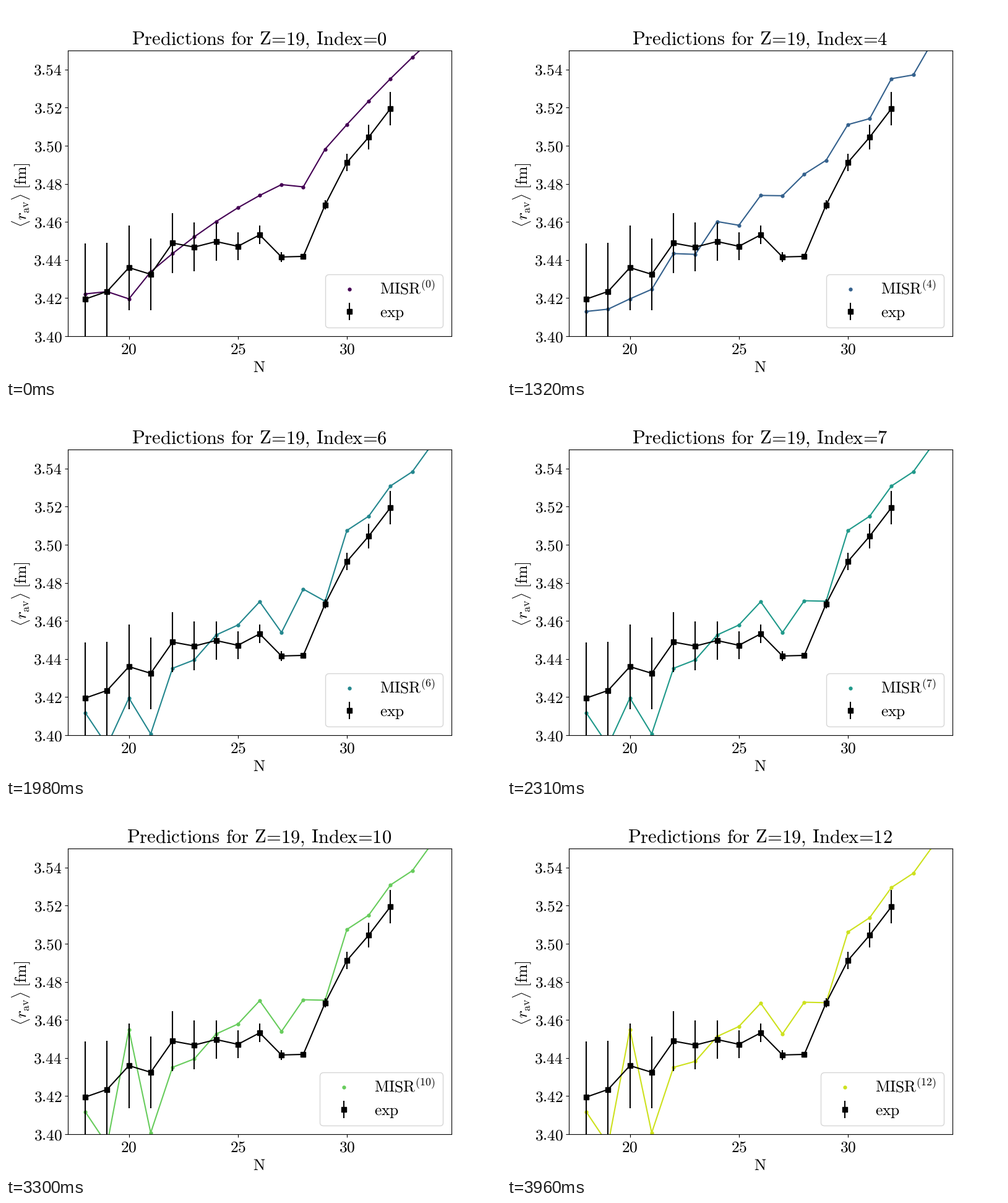
A matplotlib script for the animation above (4290 ms loop, 800 by 600 pixels).

```python
import matplotlib as mpl
import matplotlib.pyplot as plt
import numpy as np
from matplotlib.animation import FuncAnimation
from matplotlib.patches import FancyBboxPatch

mpl.rcParams.update({"mathtext.fontset": "cm", "text.hinting": "none"})

STEPS, INTERVAL = 13, 330
SIZE, TITLE_SIZE = 18.4, 22
BASE = 3.4  # radii below are in 1e-3 fm above this

N = np.arange(18, 35)
odd = N % 2 == 1


def parabola(x, y):
    return np.poly1d(np.polyfit(x, y, 2))


# Starting curve: smooth arcs with kinks at the closed shells
first = np.piecewise(
    N.astype(float), [N < 21, (N > 20) & (N < 28), N == 28, N > 28],
    [parabola([18, 19, 20], [22.2, 23.4, 19.6]),
     parabola([21, 24, 27], [33.8, 60.2, 79.6]),
     78.4,
     parabola([29, 32, 34], [98.2, 135.2, 157.0])])

# Settled curve: a trend through even N, with odd N dipping below it
trend = np.interp(N, [18, 20, 22, 26, 28, 30, 34],
                  [11.7, 19.5, 35.1, 70.1, 70.6, 107.5, 154.2])
dip = np.interp(N, [19, 21, 23, 25, 27, 29, 31],
                [21.0, 26.6, 4.3, 3.5, 16.4, 18.7, 4.2])
settled = trend - dip * odd

# Measured radii, most precise at the N=28 shell
exp = BASE + 1e-3 * np.array([19.5, 23.5, 36.0, 32.5, 48.9, 46.8, 49.7, 47.2,
                              53.2, 41.6, 41.9, 68.9, 91.2, 104.5, 119.5])
away = N[:len(exp)] - 28
err = 1e-3 * (0.3 + 2.1 * abs(away) + 0.08 * np.minimum(away, 0) ** 2)


def model(i):
    """Staggering builds up slowly, then the curve snaps to its settled form."""
    if i < 5:
        peak = np.interp(abs(N - 28), [0, 2], [6.7, 0])
        y = first - 2.3 * i * (odd | (N == 18)) + peak * min(i / 2, 1)
    else:
        y = settled + 6.1 * max(7 - i, 0) * (N == 28)
        y = y + 35.5 * (i > 7) * (N == 20) - 0.65 * max(i - 10, 0) * (N > 22)
    return BASE + 1e-3 * y


def tex(s):
    """Set plain words in Computer Modern roman."""
    return "$" + r"\hspace{0.38}".join(rf"\text{{{w}}}" for w in s.split()) + "$"


fig = plt.figure(figsize=(8, 6), dpi=100)
ax = fig.add_axes([0.125, 0.11, 0.775, 0.77])
line, = ax.plot(N, model(0), ".-", ms=7)
ax.errorbar(N[:len(exp)], exp, err, fmt="s-", color="black")
ax.set(xlim=(17.2, 34.8), ylim=(3.40, 3.55),
       xticks=[20, 25, 30], yticks=np.arange(8) * 0.02 + BASE)
ax.tick_params(labelbottom=False, labelleft=False)

# Overlay in pixel coordinates for text and legend
stage = fig.add_axes([0, 0, 1, 1])
stage.set(xlim=(0, 800), ylim=(600, 0))
stage.axis("off")


def label(x, y, s, size=SIZE, ha="center", **kw):
    return stage.text(x, y, s, size=size, ha=ha, va="baseline", **kw)


for n in (20, 25, 30):
    label(100 + (n - 17.2) * 620 / 17.6, 562.5, tex(str(n)))
for k in range(8):
    label(91, 543 - k * 61.6, tex(f"{BASE + 0.02 * k:.2f}"), ha="right")
label(409, 592, tex("N"))
label(34, 305.5, r"$\langle r_{\mathrm{av}}\rangle\hspace{0.3}\text{[fm]}$",
      rotation=90, rotation_mode="anchor")
title = label(409, 63, "", TITLE_SIZE)

box = FancyBboxPatch((516.4, 434), 190, 86, snap=True, fc="white", ec="0.8",
                     alpha=0.8, lw=1,
                     boxstyle="round,pad=0,rounding_size=5.56")
stage.add_patch(box)
dot, = stage.plot([], [], ".", ms=7)
bar, = stage.plot([], [], color="black", solid_capstyle="butt")
square, = stage.plot([], [], "s", color="black")
model_name = label(0, 465, "", ha="left")
exp_name = label(0, 503, tex("exp"), ha="left")


def update(i):
    color = mpl.colormaps["viridis"](i / STEPS)
    line.set_ydata(model(i))
    line.set_color(color)
    dot.set_color(color)
    title.set_text(tex(f"Predictions for Z=19, Index={i}"))
    model_name.set_text(rf"$\mathrm{{MISR}}^{{\mathrm{{({i})}}}}$")

    # The legend widens to the left for a two-digit index
    left = 516.4 if i < 10 else 507.0
    x = left + 38.9
    box.set_bounds(left, 434, 706.2 - left, 86.2)
    dot.set_data([x], [457.5])
    bar.set_data([x, x], [480.1, 507.9])
    square.set_data([x], [494])
    model_name.set_x(left + 88)
    exp_name.set_x(left + 88)
    return line, dot, bar, square, box, title, model_name, exp_name


anim = FuncAnimation(fig, update, frames=STEPS, interval=INTERVAL, repeat=True)
plt.show()
```
